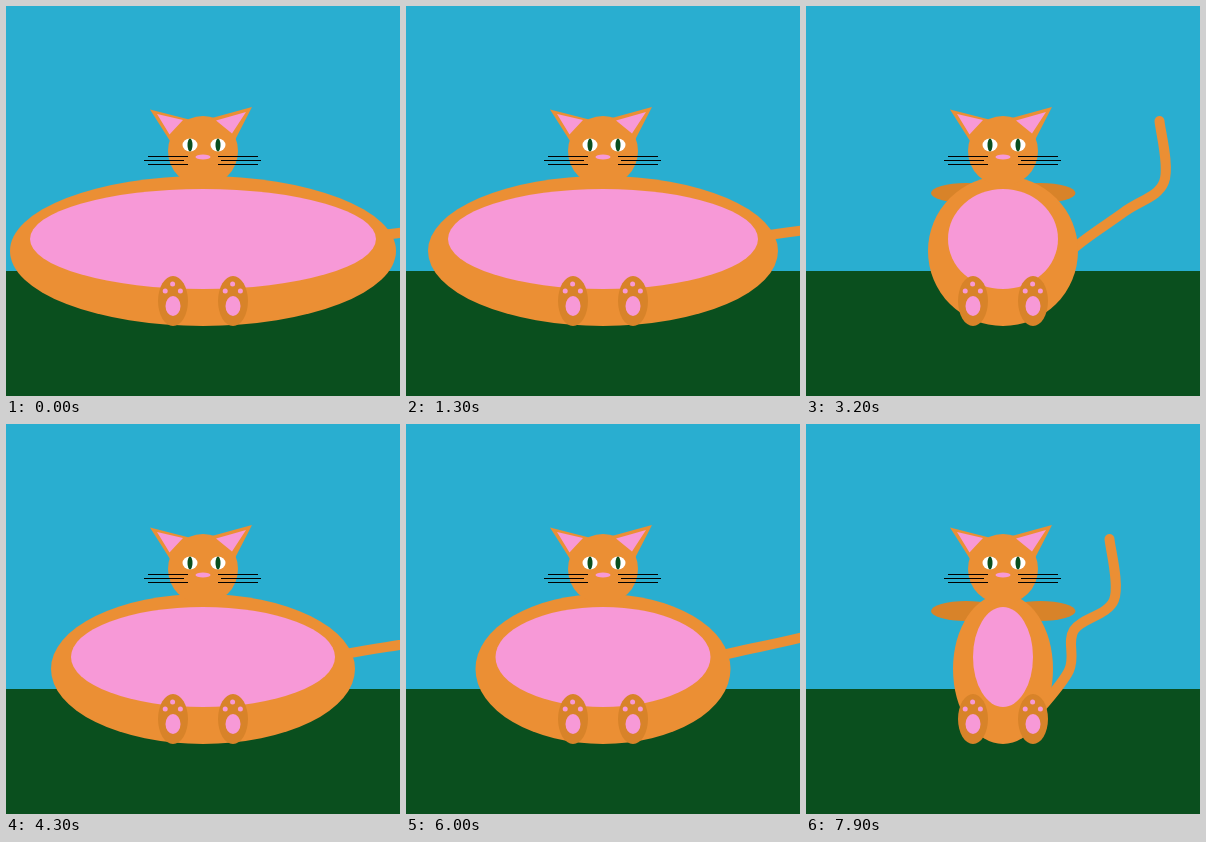
An HTML page for the animation above (8 s loop, 394 by 390 pixels).

```html
<!DOCTYPE html>
<html lang="en">
<head>
<meta charset="utf-8">
<title>Stretchy cat</title>
<style>
  html, body { margin: 0; width: 100%; height: 100%; overflow: hidden; background: #29aed0; }
  svg { display: block; width: 394px; height: 390px; }
  .fur { fill: #eb8f34; }
  .dark { fill: #d88329; }
  .pink { fill: #f799d7; }
  .green { fill: #0a4f1e; }
  .tail { fill: none; stroke: #eb8f34; stroke-width: 10; stroke-linecap: round; }
  .whiskers { stroke: #000; stroke-width: 1; }
</style>
</head>
<body>
<svg viewBox="0 0 394 390">
  <defs>
    <g id="foot">
      <ellipse class="dark" rx="15" ry="25"/>
      <g class="pink">
        <ellipse cy="5" rx="7.5" ry="10"/>
        <circle cx="-7.800" cy="-10" r="2.5"/>
        <circle cx="-.4" cy="-17" r="2.5"/>
        <circle cx="7.400" cy="-10" r="2.5"/>
      </g>
    </g>
    <g id="eye">
      <ellipse fill="#fff" rx="7.5" ry="6.5"/>
      <ellipse class="green" rx="2.5" ry="6.5"/>
    </g>
  </defs>

  <rect width="394" height="390" fill="#29aed0"/>
  <rect class="green" y="265" width="394" height="125"/>

  <path class="tail" id="tail"/>
  <ellipse class="dark" cx="160" cy="187" rx="35" ry="10"/>
  <ellipse class="dark" cx="234.5" cy="187" rx="35" ry="10"/>
  <ellipse class="fur" id="body" cx="197" cy="245" ry="75"/>
  <ellipse class="pink" id="belly" cx="197" cy="233" ry="50"/>

  <use href="#foot" x="167" y="295"/>
  <use href="#foot" x="227" y="295"/>

  <circle class="fur" cx="197" cy="145" r="35"/>
  <path class="fur" d="M144 103.500L185 114L164 135ZM246 101L204 112.500L229 134Z"/>
  <path class="pink" d="M151 108L177 114L163.500 128.500ZM240 106L210 114.500L226 127.500Z"/>
  <use href="#eye" x="184" y="139"/>
  <use href="#eye" x="212" y="139"/>
  <ellipse class="pink" cx="197" cy="151" rx="7.5" ry="2.5"/>
  <path class="whiskers" d="M142 150.500h40M138 154.500h40M142 158.500h40M212 150.500h40M215 154.500h40M212 158.500h40"/>
</svg>
<script>
  const LOOP = 8000, STEP = 100;

  // [time in ms, half width of the body]
  const keys = [
    [0, 193], [600, 200], [1300, 175], [2400, 52], [3200, 75],
    [3600, 111], [4000, 198], [4300, 152], [5100, 52], [5700, 195],
    [6000, 127.5], [6700, 56], [7300, 107.5], [7900, 50]
  ];

  const $ = id => document.getElementById(id);
  const tail = $('tail'), body = $('body'), belly = $('belly');

  // speed at a key, zero where the motion turns round
  function slope(i) {
    const a = keys[Math.max(i - 1, 0)], b = keys[Math.min(i + 1, keys.length - 1)];
    const k = keys[i][1];
    return (k - a[1]) * (b[1] - k) <= 0 ? 0 : (b[1] - a[1]) / (b[0] - a[0]);
  }

  function halfWidth(t) {
    let i = 0;
    while (i < keys.length - 2 && t >= keys[i + 1][0]) i++;
    const [t0, a] = keys[i], [t1, b] = keys[i + 1];
    const d = t1 - t0, u = (t - t0) / d, v = 1 - u;
    return v * v * ((1 + 2 * u) * a + u * d * slope(i)) +
           u * u * ((1 + 2 * v) * b - v * d * slope(i + 1));
  }

  // smooth path through all points
  function spline(pts) {
    const at = i => pts[Math.min(Math.max(i, 0), pts.length - 1)];
    let d = 'M' + pts[0];
    for (let i = 0; i < pts.length - 1; i++) {
      const [p, a, b, n] = [at(i - 1), at(i), at(i + 1), at(i + 2)];
      const c1 = a.map((v, k) => v + (b[k] - p[k]) / 6);
      const c2 = b.map((v, k) => v - (n[k] - a[k]) / 6);
      d += 'C' + [c1, c2, b].join(' ');
    }
    return d;
  }

  function draw(t) {
    const r = halfWidth(t), w = 2 * r;
    body.setAttribute('rx', r);
    belly.setAttribute('rx', r - 20);
    tail.setAttribute('d', spline([
      [w + 203.5, 115], [w + 208, 176], [w + 168, 206], [263, 246.5], [227, 293]
    ]));
  }

  const start = performance.now();
  function tick() {
    const t = (performance.now() - start) % LOOP;
    draw(Math.floor(t / STEP) * STEP);
    requestAnimationFrame(tick);
  }
  tick();
</script>
</body>
</html>
```
